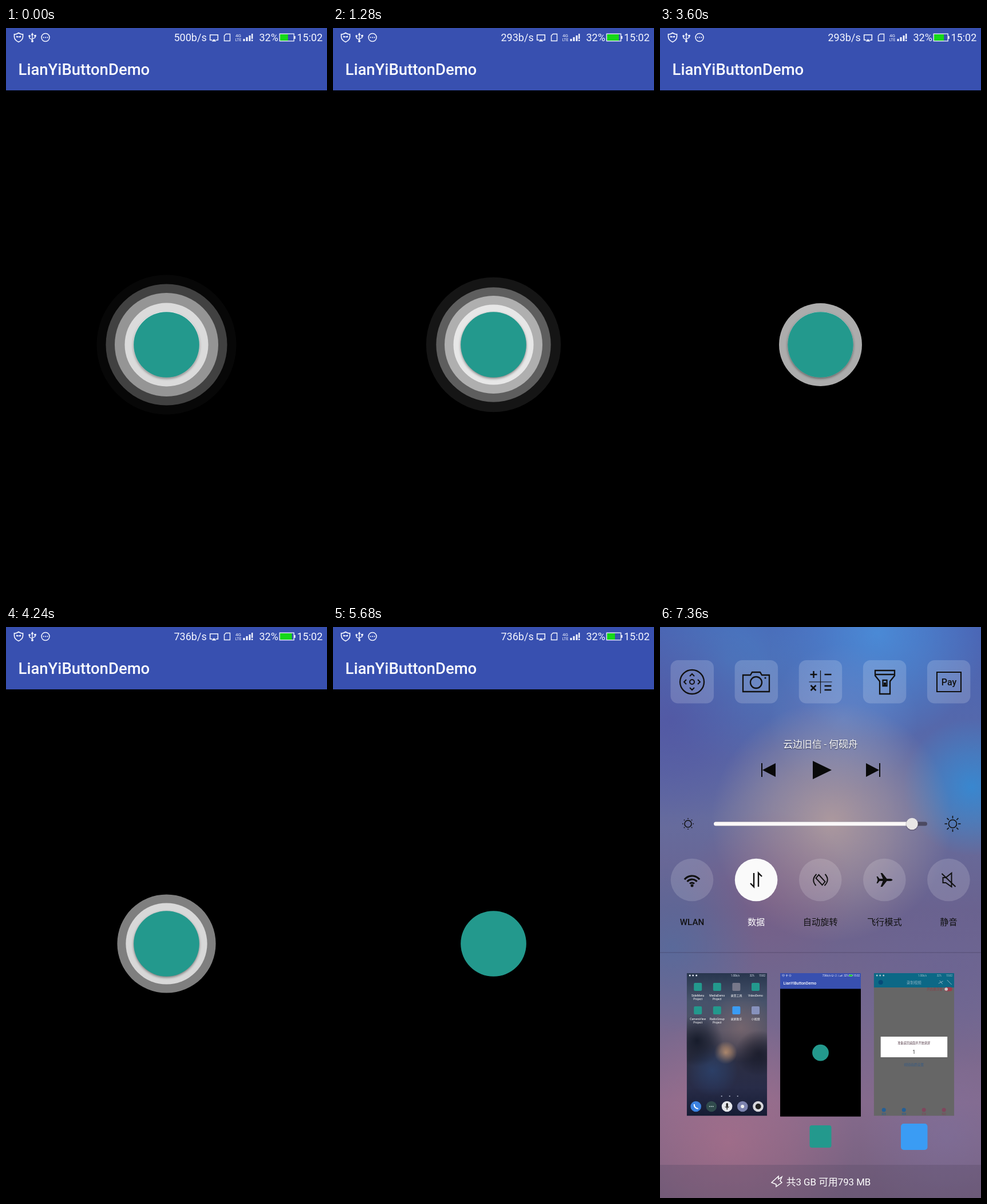
Recreate the animation shown at these times as an HTML page with a canvas. Size 561 by 998 pixels, loop 7440 ms.

```html
<!DOCTYPE html>
<html lang="zh">
<head>
<meta charset="utf-8">
<title>LianYiButtonDemo</title>
<style>
html, body { margin: 0; width: 100%; height: 100%; overflow: hidden; background: #000; }
canvas { display: block; }
</style>
</head>
<body>
<canvas id="stage" width="561" height="998"></canvas>
<script>
const W = 561, H = 998, LOOP = 7440, STEP = 80;
const c = document.getElementById('stage').getContext('2d');
const SANS = 'Roboto, sans-serif';
const CJK = 'Roboto, "Noto Sans CJK SC", "Noto Sans CJK", sans-serif';
const BLUE = '#3850b0', TEAL = '#23998d';
const CENTER = { x: 280.5, y: 553.5 };

// Ripple bursts: the time each ring leaves the button, and when the burst is on.
const SPEED = 0.02125;
const BURSTS = [
  { on: 0, off: 1680, births: [-3060, -2306, -1576, -753, -61, 668, 1390] },
  { on: 2800, off: 5440, births: [2871, 3576, 4306, 5020] }
];

function rect(x, y, w, h, fill) { c.fillStyle = fill; c.fillRect(x, y, w, h); }

function disc(x, y, r, fill) {
  c.beginPath(); c.arc(x, y, r, 0, 7); c.fillStyle = fill; c.fill();
}

function ring(x, y, r, color, width) {
  c.beginPath(); c.arc(x, y, r, 0, 7);
  c.strokeStyle = color; c.lineWidth = width; c.stroke();
}

function round(x, y, w, h, r, fill) {
  c.beginPath(); c.roundRect(x, y, w, h, r); c.fillStyle = fill; c.fill();
}

function path(d, x, y, color, width) {
  c.save(); c.translate(x, y);
  const p = new Path2D(d);
  if (width) { c.strokeStyle = color; c.lineWidth = width; c.stroke(p); }
  else { c.fillStyle = color; c.fill(p); }
  c.restore();
}

function text(s, x, y, size, color, align = 'left', weight = 400, family = SANS) {
  c.font = `${weight} ${size}px ${family}`;
  c.textAlign = align; c.fillStyle = color;
  c.fillText(s, x, y);
}

function glow(x, y, r, rgb, alpha) {
  const g = c.createRadialGradient(x, y, 0, x, y, r);
  g.addColorStop(0, `rgba(${rgb},${alpha})`);
  g.addColorStop(0.5, `rgba(${rgb},${alpha * 0.55})`);
  g.addColorStop(1, `rgba(${rgb},0)`);
  rect(x - r, y - r, 2 * r, 2 * r, g);
}

function vertical(y0, y1, colors) {
  const g = c.createLinearGradient(0, y0, 0, y1);
  colors.forEach((color, i) => g.addColorStop(i / (colors.length - 1), color));
  return g;
}

function faded(alpha, draw) {
  if (alpha <= 0) return;
  c.save(); c.globalAlpha = alpha; draw(); c.restore();
}

function netSpeed(t) { return t < 1040 ? '500b/s' : t < 4080 ? '293b/s' : '736b/s'; }

function chargeLevel(t) { return ((Math.floor((t - 1885) / 472) % 6) + 6) % 6; }

function statusBar(t) {
  const ink = '#f4f6ff';
  path('M0 -8 Q4 -5 7.5 -5.5 V-1 Q7 5 0 8 Q-7 5 -7.5 -1 V-5.5 Q-4 -5 0 -8Z', 22, 16.5, ink, 1.7);
  path('M-4 -3 L0 -1.5 L4 -3 V0 H1 L0 -1 L-1 0 H-4Z', 22, 16.5, ink);
  path('M0 -5 V7 M-5 -2 V1 L0 4 M5 -3 V0 L0 3', 46, 16.5, ink, 1.4);
  path('M-2.5 -4 L0 -8.5 L2.5 -4Z M3.3 -4.5 h3.4 v3 h-3.4Z', 46, 16.5, ink);
  disc(46, 23, 2, ink);
  disc(41, 14, 1.8, ink);
  ring(69, 16.5, 7, ink, 1.5);
  [-3.4, 0, 3.4].forEach(dx => disc(69 + dx, 16.5, 1.1, ink));
  text(netSpeed(t), 293.5, 23, 18, ink);
  path('M-3 4.5 H-6.8 V-4.5 H6.8 V4.5 H3', 363.5, 16.5, ink, 1.6);
  path('M0 2.5 L4 7 H-4Z', 363.5, 16.5, ink);
  path('M-2 -6 H5 V6 H-5 V-3Z', 386.5, 16.5, ink, 1.4);
  text('4G', 406, 15.5, 8, ink, 'center');
  text('LTE', 406, 23.3, 7, ink, 'center');
  [4, 7, 10].forEach((h, i) => rect(414.5 + i * 5, 23 - h, 3, h, ink));
  rect(429, 10, 2.4, 9, ink);
  rect(429, 20.5, 2.4, 2.5, ink);
  text('32%', 442.5, 23, 18, ink);
  rect(479, 11, 7 + 3.4 * chargeLevel(t), 11, '#16d818');
  c.strokeStyle = ink; c.lineWidth = 1.3;
  c.strokeRect(478.2, 10.2, 25, 12.6);
  rect(504, 14, 1.7, 5, ink);
  text('15:02', 508.5, 23, 18, ink);
}

function ripples(t) {
  const burst = BURSTS.find(b => t >= b.on && t < b.off);
  if (!burst) return;
  for (const born of burst.births) {
    const r = 57 + (t - born) * SPEED;
    if (r > 57 && r < 124) disc(CENTER.x, CENTER.y, r, `rgba(255,255,255,${0.0131 * (124 - r)})`);
  }
}

function button() {
  c.save();
  c.shadowColor = 'rgba(0,0,0,.45)'; c.shadowBlur = 4; c.shadowOffsetY = 2;
  disc(CENTER.x, CENTER.y, 57.3, TEAL);
  c.restore();
}

function app(t) {
  rect(0, 0, W, H, '#000');
  rect(0, 0, W, 109, BLUE);
  text('LianYiButtonDemo', 21.5, 81.5, 27.5, '#fafbff', 'left', 500);
  ripples(t);
  button();
}

function wallpaper() {
  rect(0, 0, W, H, vertical(0, H, ['#4a64b4', '#5468ac', '#666c9e', '#6a628e', '#74688f', '#856a8c', '#75607e']));
  glow(380, 10, 190, '74,150,225', 0.75);
  glow(120, 60, 170, '72,140,205', 0.5);
  glow(20, 160, 190, '82,82,160', 0.7);
  glow(545, 280, 120, '50,140,215', 0.85);
  glow(320, 160, 130, '110,145,210', 0.5);
  glow(300, 340, 210, '184,160,158', 0.85);
  glow(190, 470, 150, '150,90,120', 0.3);
  glow(20, 560, 150, '70,110,165', 0.5);
  glow(500, 610, 170, '105,100,150', 0.5);
  glow(120, 900, 220, '190,115,140', 0.5);
  glow(500, 890, 150, '125,115,165', 0.45);
}

function tileIcons() {
  const y = 96, ink = '#111';
  ring(56, y, 21, ink, 2.3);
  ring(56, y, 4, ink, 2);
  path('M-4 -10 L0 -14 L4 -10 M-4 10 L0 14 L4 10 M-10 -4 L-14 0 L-10 4 M10 -4 L14 0 L10 4', 56, y, ink, 2);
  path('M-23 -12 H-10 L-7 -17 H7 L10 -12 H23 V17 H-23Z', 168, y, ink, 2.3);
  ring(168, 97, 10, ink, 2.3);
  disc(184, 89, 1.6, ink);
  path('M0 -20 V20 M-20 0 H20', 280.5, y, ink, 1.2);
  path('M-12 -19 V-7 M-18 -13 H-6 M7 -13 H19 M-17 6 L-8 15 M-8 6 L-17 15 M7 7 H19 M7 14 H19', 280.5, y, ink, 2.5);
  path('M-17 -20 H17 V-11 L9 -1 V21 H-9 V-1 L-17 -11Z M-17 -13 H17 M-3.5 -3 H3.5 V7 H-3.5Z', 393, y, ink, 2.3);
  rect(391, 97, 4, 5, ink);
  path('M-21 -17 H21 V17 H-21Z', 505, y, ink, 2.1);
  text('Pay', 505, 101.5, 16, ink, 'center', 500);
}

function sun(x, y, r, ray) {
  ring(x, y, r, '#111', 1.6);
  for (let i = 0; i < 8; i++) {
    const a = i * Math.PI / 4, cos = Math.cos(a), sin = Math.sin(a);
    path(`M${cos * (r + 2.5)} ${sin * (r + 2.5)} L${cos * ray} ${sin * ray}`, x, y, '#111', 1.6);
  }
}

function toggles() {
  const y = 442, ink = '#111';
  ['WLAN', '数据', '自动旋转', '飞行模式', '静音'].forEach((label, i) => {
    const x = 56 + i * 112.1, active = i === 1;
    disc(x, y, 37.3, active ? '#fafafa' : 'rgba(255,255,255,.15)');
    text(label, x, 521, 15.2, active ? '#fff' : '#111', 'center', 500, CJK);
  });
  [5, 11, 17].forEach(r => {
    c.beginPath(); c.arc(56, 452, r, -Math.PI * 0.78, -Math.PI * 0.22);
    c.strokeStyle = ink; c.lineWidth = 3.2; c.stroke();
  });
  disc(56, 452, 2.5, ink);
  path('M-4 -12 V12 L-10 6 M4 12 V-12 L10 -6', 168, y, ink, 2.4);
  path('M-3 -9 L8 3 L3 9 L-8 -3Z M-7 -10 Q-17 0 -8 10 M7 10 Q17 0 8 -10', 280.5, y, ink, 1.9);
  path('M14 0 Q13 -2 10 -2 H4 L-4 -12 H-7 L-3 -2 H-9 L-12 -6 H-14 L-12 0 L-14 6 H-12 L-9 2 H-3 L-7 12 H-4 L4 2 H10 Q13 2 14 0Z', 392.5, y, ink);
  path('M-10 -4 H-5 L5 -12 V12 L-5 5 H-10Z M-12 -11 L12 12', 504.5, y, ink, 2);
}

function controls() {
  for (let i = 0; i < 5; i++) round(18.5 + i * 112.1, 58, 75.5, 75.5, 13, 'rgba(255,255,255,.17)');
  tileIcons();
  c.save();
  c.shadowColor = 'rgba(0,0,0,.6)'; c.shadowBlur = 2; c.shadowOffsetY = 1;
  text('云边旧信 - 何砚舟', 280.5, 210.5, 16.8, '#fff', 'center', 400, CJK);
  c.restore();
  path('M-12 -12 V12', 190, 250, '#0a0a0a', 2);
  path('M12 -12 V12 L-11 0Z', 190, 250, '#0a0a0a');
  path('M-14 -16 L19 0 L-14 16Z', 281, 250, '#0a0a0a');
  path('M-12 -12 L11 0 L-12 12Z', 372, 250, '#0a0a0a');
  path('M12 -12 V12', 372, 250, '#0a0a0a', 2);
  round(94, 340.5, 373, 7, 3.5, '#4c4a62');
  round(94, 340.5, 348, 7, 3.5, '#fbf8f8');
  disc(440.5, 345, 11, 'rgba(60,50,70,.35)');
  disc(440.5, 344, 10.3, '#e8e6e6');
  sun(49, 344, 6, 10);
  sun(511.5, 344, 7, 14);
  toggles();
  rect(0, 568.5, W, 1, 'rgba(40,30,60,.35)');
  rect(0, 940, W, 58, 'rgba(90,75,105,.35)');
  path('M-9 2 L3 -9 L3 -4 L9 -8 L6 -1 L9 2 L-1 9 L-1 5Z', 204, 969, '#fff', 1.5);
  text('共3 GB 可用793 MB', 294.5, 975.5, 16.8, '#fff', 'center', 400, CJK);
}

function tinyStatus(color) {
  [2.5, 8, 14].forEach(x => disc(x + 3, 4, 1.5, color));
  text('1.00b/s', 77, 5.8, 4.5, color);
  text('32%', 110, 5.8, 4.5, color);
  text('15:02', 126, 5.8, 4.5, color);
}

function homeCard() {
  rect(0, 0, 140.5, 249.5, vertical(0, 249.5, ['#28364e', '#46526a', '#4f5064', '#2c2e42', '#282c48', '#161c34']));
  glow(95, 95, 60, '160,125,120', 0.45);
  glow(68, 139, 20, '235,175,120', 0.7);
  glow(45, 170, 45, '45,75,125', 0.6);
  glow(18, 118, 45, '12,18,32', 0.8);
  glow(125, 140, 40, '18,20,34', 0.7);
  tinyStatus('#dfe6f4');
  const labels = ['SideMenu', 'MediaDemo', '录音工具', 'VideoDemo', 'CameraView', 'RadioGroup', '录屏助手', '小视频'];
  labels.forEach((label, i) => {
    const x = 19.5 + (i % 4) * 33.6, y = 24 + Math.floor(i / 4) * 41;
    round(x - 7, y - 7, 14, 14, 2, ['#77788a', '', '', '', '#3a9cf4', '#8792bd'][i === 2 ? 0 : i === 6 ? 4 : i === 7 ? 5 : 1] || TEAL);
    text(label, x, y + 17, 5, '#fff', 'center', 400, CJK);
    if (i < 2 || i === 4 || i === 5) text('Project', x, y + 23, 5, '#fff', 'center');
  });
  [56, 70, 84].forEach(x => disc(x + 5, 215, 1.1, '#aab0c4'));
  ['#3c82e0', '#304b4d', '#e6e8ec', '#7c83ae', '#d8d8dc'].forEach((color, i) => disc(16 + i * 27.2, 233, 9.3, color));
  path('M-3 -4 Q-3 3 4 4', 16, 233, '#fff', 2);
  [-3, 0, 3].forEach(dx => disc(43 + dx, 233, 1, '#b9cccc'));
  round(68.8, 227, 3.4, 8, 1.7, '#222');
  path('M-3.5 0 Q0 6 3.5 0 M0 3 V6', 70.5, 233, '#222', 1);
  disc(97.5, 233, 3, '#eee');
  disc(125, 233, 5, '#222');
}

function recorderCard() {
  rect(0, 0, 140.5, 249.5, '#666');
  rect(0, 0, 140.5, 25, '#0c6886');
  tinyStatus('#aac2ce');
  text('录制视频', 70, 19, 6.5, '#8eb2c2', 'center', 400, CJK);
  disc(12, 16, 4, '#064a78');
  path('M-4 2 L4 -2 M-2 -3 L3 3', 117, 16, '#8eb2c2', 1);
  path('M-4 -4 L4 4', 132, 16, '#8eb2c2', 1);
  text('开启悬浮窗', 120, 30, 5.5, '#8a3d47', 'right', 400, CJK);
  round(123, 24.5, 14, 7, 3.5, '#a03a4a');
  disc(126.5, 28, 2.8, '#ccc');
  rect(12, 111, 116.5, 36, '#fff');
  text('准备返回桌面并开始录屏', 70, 124, 5.2, '#553c48', 'center', 400, CJK);
  text('1', 70, 141, 9, '#333', 'center');
  text('视频画质设置', 70, 162, 5.8, '#375b84', 'center', 400, CJK);
  ['首页', '视频', '发现', '我的'].forEach((label, i) => {
    const x = 17.5 + i * 35, color = i < 2 ? '#245f96' : '#80465c';
    disc(x, 239, 3.5, color);
    text(label, x, 248, 4, color, 'center', 400, CJK);
  });
}

function cards(p, t) {
  const x = 210 * p, y = 605 * p, width = W + (141 - W) * p, k = width / 141;
  const place = (dx, scale, draw) => {
    c.save(); c.translate(x + dx * k, y); c.scale(scale, scale);
    c.beginPath(); c.rect(0, 0, scale === k ? 140.5 : W, scale === k ? 249.5 : H); c.clip();
    draw(); c.restore();
  };
  place(-163.3, k, homeCard);
  place(163.7, k, recorderCard);
  place(0, width / W, () => {
    app(t);
    faded(p, () => statusBar(t));
  });
  faded(p, () => {
    round(261.5, 871, 38, 39, 4, TEAL);
    round(421, 868, 46.5, 46, 5, '#3a9cf4');
  });
}

function recentsProgress(t) {
  const u = Math.min(1, Math.max(0, (t - 7104) / 255));
  return (1 - Math.cos(Math.PI * u)) / 2;
}

function draw(t) {
  const p = recentsProgress(t);
  if (p === 0) {
    app(t);
    statusBar(t);
    return;
  }
  wallpaper();
  faded(p, controls);
  cards(p, t);
  faded(1 - p, () => statusBar(t));
}

const start = performance.now();
function tick() {
  const t = (performance.now() - start) % LOOP;
  draw(Math.floor(t / STEP) * STEP);
  requestAnimationFrame(tick);
}
tick();
</script>
</body>
</html>
```
